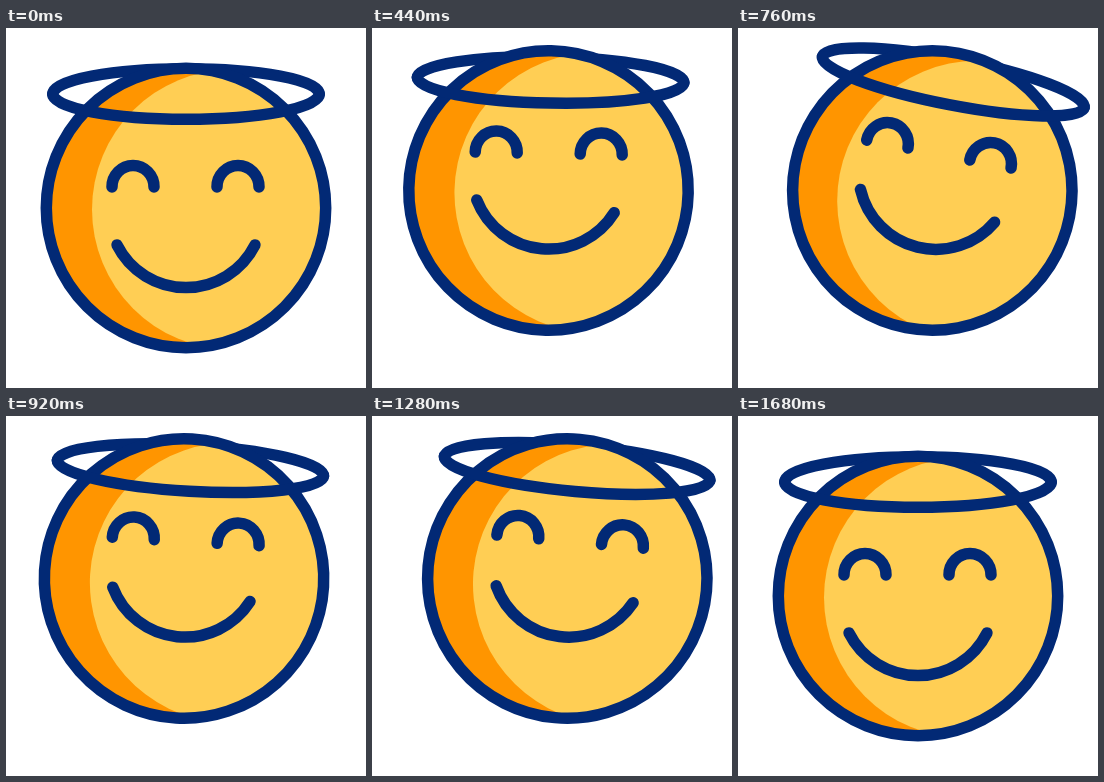
An HTML page that plays this animation: 360x360 px, repeating every 2 s.

```html
<!DOCTYPE html>
<html lang="en">
<head>
<meta charset="utf-8">
<title>Angel smiley</title>
<style>
  html, body { margin: 0; width: 100%; height: 100%; overflow: hidden; background: #fff; }
  svg { display: block; width: 100%; height: 100%; }
  .line { fill: none; stroke: #022975; stroke-width: 11.5; stroke-linecap: round; }
</style>
</head>
<body>
<svg viewBox="0 0 360 360">
  <clipPath id="disc"><circle r="140"/></clipPath>
  <g id="head">
    <path id="back" class="line"/>
    <circle r="140" fill="#ff9500"/>
    <g clip-path="url(#disc)"><circle cx="46" cy="1.5" r="140" fill="#ffce54"/></g>
    <circle class="line" r="139.7"/>
    <path id="eyes" class="line" d="M-74-21a21 21.5 0 0 1 42 0M31-21a21 21.5 0 0 1 42 0"/>
    <path id="mouth" class="line" d="M-69 37A77.2 77.2 0 0 0 69 37"/>
    <path id="front" class="line"/>
  </g>
</svg>
<script>
  const LOOP = 2000, STEP = 40, END = 1680, SWINGS = 5;

  // The head leads, its tilt follows, the mouth trails last.
  const sway = { first: 300, gap: 244, drift: 0, size: 15.3, decay: 1 };
  const tilt = { first: 330, gap: 210, drift: 13, size: 15.8, decay: 0.9 };
  const grin = { first: 385, gap: 200, drift: 12, size: 6, decay: 0.92 };

  const ease = p => (1 - Math.cos(Math.PI * Math.min(1, Math.max(0, p)))) / 2;

  // Ease from one side to the other, then back to rest at END.
  function swing(t, { first, gap, drift, size, decay }) {
    let from = 0, a = 0;
    for (let n = 0; n <= SWINGS; n++) {
      const last = n === SWINGS;
      const to = last ? END : first + gap * n + drift * n * n;
      const b = last ? 0 : size * (-decay) ** n;
      if (t < to) return a + (b - a) * ease((t - from) / (to - from));
      from = to;
      a = b;
    }
    return 0;
  }

  const [head, back, eyes, mouth, front] =
    ['head', 'back', 'eyes', 'mouth', 'front'].map(id => document.getElementById(id));

  const place = (el, x, y, turn) =>
    el.setAttribute('transform', `translate(${x} ${y}) rotate(${turn})`);

  const halo = (el, y, ry, sweep) =>
    el.setAttribute('d', `M-133.3 ${y}a133.3 ${ry} 0 0 ${sweep} 266.6 0`);

  function draw(now) {
    const t = Math.floor(now % LOOP / STEP) * STEP;
    const lift = ease(t / 320) * ease((END - t) / 380);
    const y = -114 + 3.5 * lift, ry = 25.3 - 2.2 * lift;
    place(head, 180 + swing(t, sway), 180 - 17.5 * lift, swing(t, tilt));
    place(eyes, 0, -16 * lift, 0);
    place(mouth, 0, -21 * lift, swing(t, grin));
    halo(back, y, ry, 1);
    halo(front, y, ry, 0);
  }

  const start = performance.now();
  function tick() {
    draw(performance.now() - start);
    requestAnimationFrame(tick);
  }
  tick();
</script>
</body>
</html>
```
